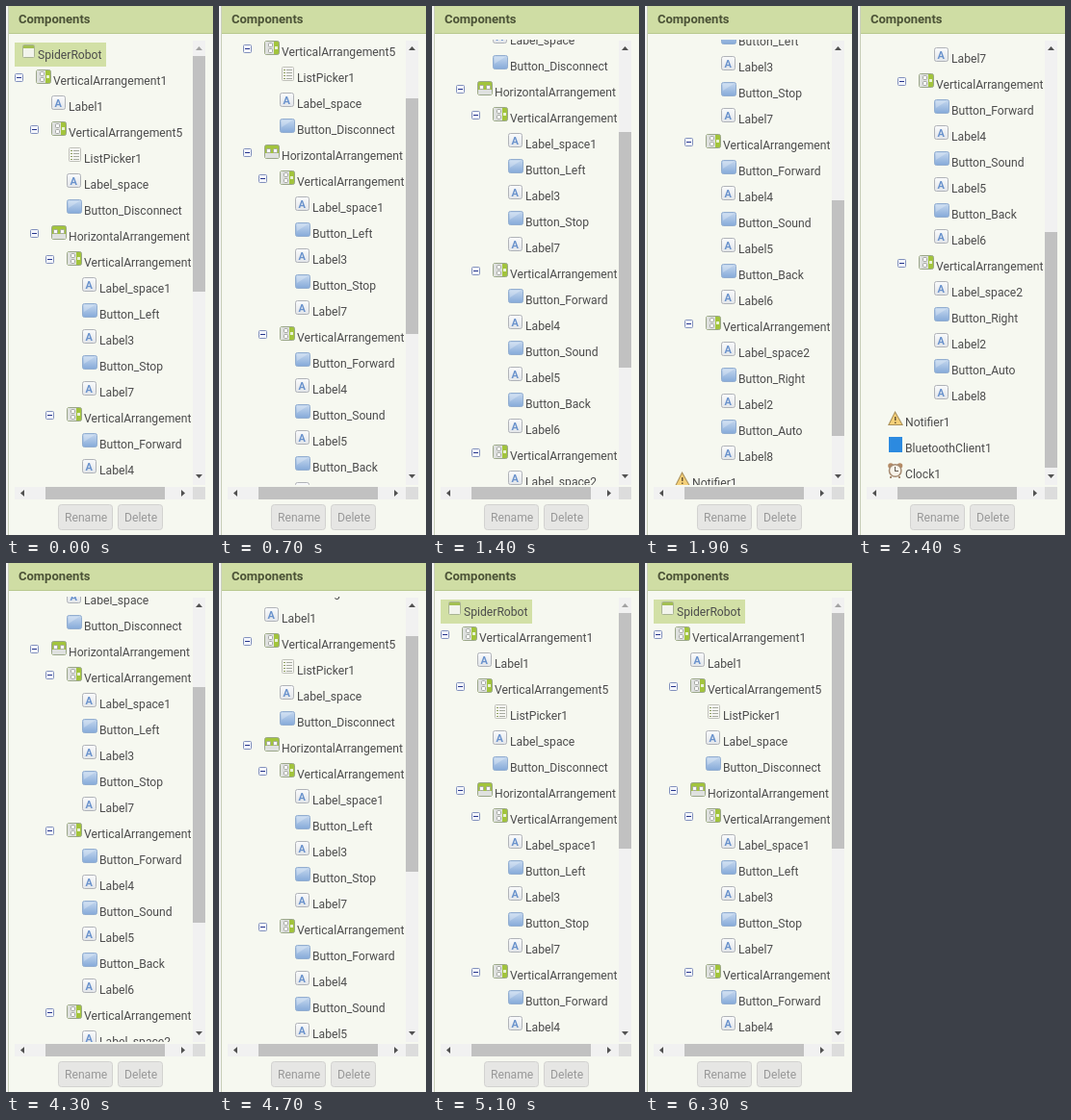
Recreate the animation shown at these times as an HTML page with a canvas. Size 215x550 px, loop 6800 ms.

```html
<!DOCTYPE html>
<html lang="en">
<head>
<meta charset="utf-8">
<title>Component tree</title>
<style>
html, body { margin: 0; width: 100%; height: 100%; overflow: hidden; background: #f6f8f0; }
canvas { display: block; }
</style>
</head>
<body>
<canvas id="stage" width="215" height="550"></canvas>
<script>
const ctx = document.getElementById('stage').getContext('2d');
const LOOP = 6800, STEP = 100, GLIDE = 150;
const MAX_SCROLL = 347, ROW = 27, FIRST_ROW = 50;
const FONT = 'Roboto, sans-serif';
const ARROW = '#505050', ARROW_OFF = '#a3a3a3';

// Wheel notches: start time and scroll distance
const notches = [
  [588, 100], [1325, 100], [1788, 100], [2225, 47],
  [3790, -100], [4125, -100], [4488, -100], [4888, -47]
];
const hoverTimes = [100, 6200];

// One line per component: indent level, icon, name
const rows = `0 form SpiderRobot
1 vertical VerticalArrangement1
2 label Label1
2 vertical VerticalArrangement5
3 list ListPicker1
3 label Label_space
3 button Button_Disconnect
2 horizontal HorizontalArrangement
3 vertical VerticalArrangement
4 label Label_space1
4 button Button_Left
4 label Label3
4 button Button_Stop
4 label Label7
3 vertical VerticalArrangement
4 button Button_Forward
4 label Label4
4 button Button_Sound
4 label Label5
4 button Button_Back
4 label Label6
3 vertical VerticalArrangement
4 label Label_space2
4 button Button_Right
4 label Label2
4 button Button_Auto
4 label Label8
1 notifier Notifier1
1 bluetooth BluetoothClient1
1 clock Clock1`.split('\n').map(line => {
  const [level, icon, name] = line.split(' ');
  return { level: +level, icon, name };
});

function rect(x, y, w, h, fill) {
  ctx.fillStyle = fill;
  ctx.fillRect(x, y, w, h);
}

function roundBox(x, y, w, h, r, fill, stroke) {
  ctx.beginPath();
  ctx.roundRect(x + .5, y + .5, w - 1, h - 1, r);
  ctx.fillStyle = fill;
  ctx.fill();
  ctx.strokeStyle = stroke;
  ctx.lineWidth = 1;
  ctx.stroke();
}

function polygon(points, fill) {
  ctx.beginPath();
  points.forEach(([x, y]) => ctx.lineTo(x, y));
  ctx.closePath();
  ctx.fillStyle = fill;
  ctx.fill();
}

function disc(x, y, r, fill) {
  ctx.beginPath();
  ctx.arc(x, y, r, 0, 2 * Math.PI);
  ctx.fillStyle = fill;
  ctx.fill();
}

function text(str, x, y, color, font = '12.15px ' + FONT) {
  ctx.font = font;
  ctx.fillStyle = color;
  ctx.fillText(str, x, y);
}

function shade(y, h, from, to) {
  const g = ctx.createLinearGradient(0, y, 0, y + h);
  g.addColorStop(0, from);
  g.addColorStop(1, to);
  return g;
}

// Icons are drawn in a 16 by 16 box
const icons = {
  form() {
    roundBox(2, 1, 13, 14, 1, '#f2f4ec', '#aab594');
    rect(3, 2, 11, 3, '#a3bf52');
  },
  vertical() {
    roundBox(0, 0, 16, 15, 2, '#a2c43c', '#9aa68a');
    rect(1, 1, 9, 13, '#dfe1df');
    for (const y of [2, 8]) roundBox(4, y, 5, 5, 1, '#fafafa', '#a2a5a0');
    rect(11, 6, 3, 3, '#e9f2d5');
  },
  horizontal() {
    roundBox(0, 0, 16, 15, 2, '#a2c43c', '#9aa68a');
    rect(1, 9, 14, 5, '#dfe1df');
    for (const x of [2, 9]) roundBox(x, 4, 5, 5, 1, '#fafafa', '#a2a5a0');
  },
  label() {
    roundBox(0, 0, 15, 15, 2, shade(0, 15, '#fafbfc', '#e2e5e9'), '#b0b3b8');
    text('A', 3.5, 11.5, '#6a92cc', 'bold 11px ' + FONT);
  },
  list() {
    roundBox(2, 0, 13, 15, 1, '#f7f7f3', '#c0c1ba');
    for (const y of [3, 6, 9, 12]) {
      rect(4, y, 2, 1, '#8fa063');
      rect(7, y, 6, 1, '#a6aa9f');
    }
  },
  button() {
    roundBox(0, 0, 16, 15, 2, shade(0, 15, '#c9dbf0', '#83a8d8'), '#93aed0');
    polygon([[2, 2], [13, 2], [2, 9]], 'rgba(255,255,255,.25)');
  },
  notifier() {
    polygon([[7.5, 0], [16, 15], [0, 15]], '#a98f58');
    polygon([[7.5, 2.2], [14.3, 14], [1.7, 14]], '#f5d078');
    rect(7, 6, 1.5, 4, '#6b5632');
    rect(7, 11.5, 1.5, 1.5, '#6b5632');
  },
  bluetooth() {
    rect(1, 0, 14, 16, '#2c8ae0');
  },
  clock() {
    disc(3, 3, 2.8, '#b58a64');
    disc(12.5, 3, 2.8, '#b58a64');
    disc(7.7, 8, 7, '#a68b72');
    disc(7.7, 8, 5.5, '#f7f3e9');
    rect(7, 4, 1, 5, '#655b50');
    rect(7, 8, 4, 1, '#655b50');
    rect(2, 14, 2, 2, '#a68b72');
    rect(11, 14, 2, 2, '#a68b72');
  }
};

function drawToggle(x, y) {
  roundBox(x, y, 9, 9, 1, '#f3f5fb', '#8291bd');
  rect(x + 2, y + 4, 5, 1, '#26358c');
}

function drawRow({ level, icon, name }, y) {
  const x = 33 + 16 * level;
  if (icon === 'form') rect(9, y - 12, 95, 25, '#d2e0a6');
  if (/vertical|horizontal/.test(icon)) drawToggle(x - 40, y - 7);
  ctx.save();
  ctx.translate(x - 18, y - 11);
  icons[icon]();
  ctx.restore();
  text(name, x, y + 5, '#4c4c4c');
}

function drawTree(scroll) {
  ctx.save();
  ctx.beginPath();
  ctx.rect(9, 35, 184, 463);
  ctx.clip();
  rows.forEach((row, i) => {
    const y = FIRST_ROW + i * ROW - scroll;
    if (y > 15 && y < 515) drawRow(row, y);
  });
  ctx.restore();
}

function drawScrollbars(scroll, hovered) {
  rect(194, 36, 13, 462, '#f1f1f1');
  rect(194, 52 + Math.floor(scroll * .53), 13, 245, hovered ? '#a8a8a8' : '#c1c1c1');
  polygon([[197, 46], [200.5, 42], [204, 46]], scroll > 0 ? ARROW : ARROW_OFF);
  polygon([[197, 487], [200.5, 491], [204, 487]], ARROW);

  rect(9, 500, 185, 13, '#f1f1f1');
  rect(41, 500, 124, 13, '#c1c1c1');
  rect(194, 500, 13, 13, '#dcdcdc');
  polygon([[19, 503], [15, 506.5], [19, 510]], ARROW);
  polygon([[182, 503], [186, 506.5], [182, 510]], ARROW);
}

function drawPanel() {
  rect(0, 0, 215, 550, '#f6f8f0');
  rect(0, 0, 2, 550, '#f4f4f4');
  rect(2, 0, 1, 550, '#c9cfba');
  rect(3, 0, 212, 28, '#cfdda4');
  rect(3, 28, 212, 1, '#b9c98f');
  text('Components', 13, 18, '#4b5236', 'bold 13px ' + FONT);
  for (const [name, x, w] of [['Rename', 54, 57], ['Delete', 116, 47]]) {
    roundBox(x, 518, w, 27, 3, '#e6e6e4', '#d2d2d0');
    text(name, x + 7, 536, '#999');
  }
}

function scrollAt(time) {
  const total = notches.reduce((sum, [start, distance]) => {
    const p = Math.min(1, Math.max(0, (time - start) / GLIDE));
    return sum + distance * p * p * (3 - 2 * p);
  }, 0);
  return Math.min(MAX_SCROLL, Math.round(total));
}

const origin = performance.now();

function draw() {
  const elapsed = performance.now() - origin;
  const time = Math.floor(elapsed % LOOP / STEP) * STEP;
  const scroll = scrollAt(time);
  drawPanel();
  drawTree(scroll);
  drawScrollbars(scroll, hoverTimes.includes(time));
  requestAnimationFrame(draw);
}

draw();
</script>
</body>
</html>
```
